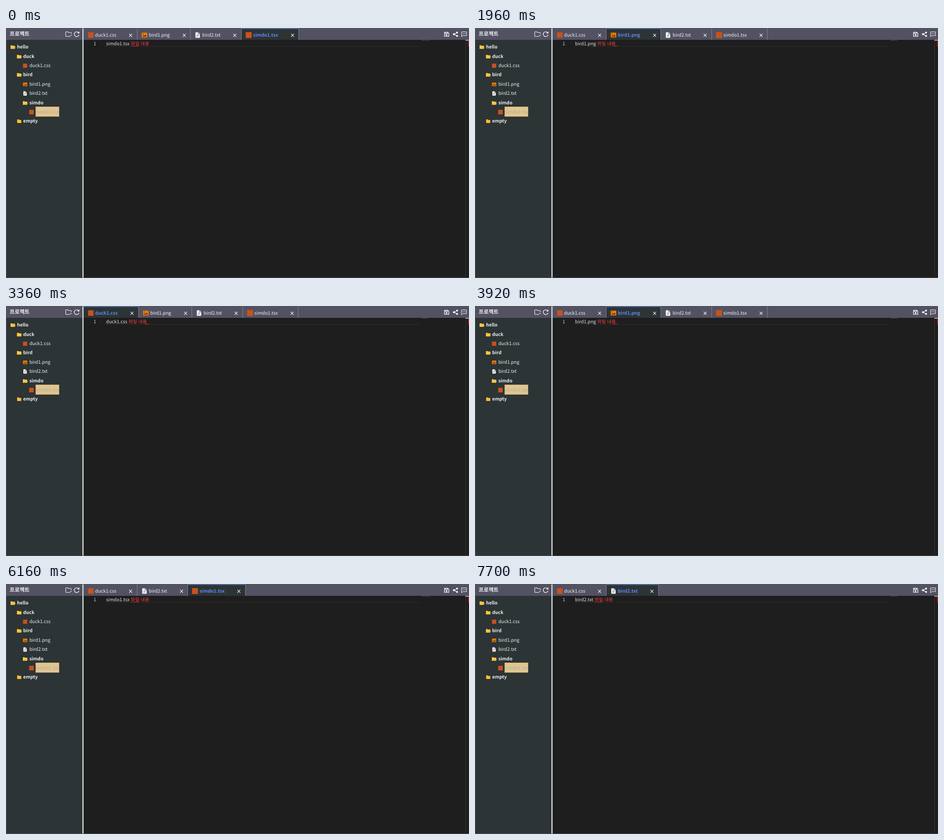
These frames come from a looping animation (1018 by 550 pixels, 8000 ms). An HTML page:

```html
<!DOCTYPE html>
<html lang="ko">
<head>
<meta charset="utf-8">
<title>Project editor</title>
<style>
  html, body { margin: 0; width: 100%; height: 100%; overflow: hidden; background: #1e1e1e; }
  body {
    position: relative; color: #f1f2f4; text-rendering: geometricPrecision;
    font: 10.2px/20.4px "Noto Sans CJK KR", "Noto Sans CJK JP", "Noto Sans CJK", sans-serif;
  }
  div, .stage > svg, .tab svg, .row svg, .name { position: absolute; white-space: pre; }
  svg { overflow: visible; }
  .stage { left: 0; top: 0; width: 1018px; height: 550px; overflow: hidden; }
  .side { left: 0; top: 0; width: 168px; height: 550px; background: #2d3436; }
  .bar { left: 0; top: 0; width: 1018px; height: 26px; background: #535263; }
  .title { left: 8px; top: 3px; font-size: 11.9px; font-weight: 700; }
  .tabs, .stage > svg { left: 0; top: 0; }
  .split { left: 168px; top: 0; width: 2px; height: 550px; background: #dcdde1; border-right: 1px solid #85858b; }
  .edge { left: 0; top: 0; width: 1017px; height: 548px; border: 1px solid #53535b; border-width: 1px 0 1px 1px; }

  .row { left: 0; width: 168px; height: 20.4px; color: #eceeef; }
  .row svg { top: 6px; width: 10px; height: 10px; }
  .row .name { top: 0; }
  .folder { font-weight: 700; }
  .row .picked {
    top: -1px; line-height: 22px; color: #b5ad9b; background: #dec694;
    box-shadow: inset 0 0 0 1px #dcad5f;
  }

  .tab { top: 1px; height: 25px; border-right: 1px solid #85848f; box-sizing: border-box; }
  .tab svg { left: 9.2px; top: 8px; width: 13px; height: 13px; }
  .tab .close { left: auto; right: 9.5px; top: 10.5px; width: 8px; height: 8px; }
  .tab .name { left: 25.6px; top: 3.6px; font-weight: 500; }
  .tab.on { top: 0; height: 26px; background: #2d3436; border-top: 2px solid #5b83e6; }
  .tab.on svg { top: 7px; }
  .tab.on .close { top: 9.5px; }
  .tab.on .name { top: 2.6px; color: #5f87f2; font-weight: 700; }

  .line { left: 217px; top: 26px; width: 691px; height: 14px; border-bottom: 1px solid #303030; }
  .num { left: 192.5px; top: 23.5px; color: #d0d0d0; }
  .code { left: 220.1px; top: 23.5px; color: #e2e2e2; }
  .bad { position: relative; color: #ff3b3b; }
  .bad svg { position: absolute; left: 0; top: 12.4px; width: 19px; height: 3px; }
  .bad .tail { left: auto; right: -3px; width: 7px; }
  .ruler { left: 1010px; top: 26px; width: 1px; height: 521px; background: #363636; }
  .caret { left: 1010px; top: 26px; width: 8px; height: 1.5px; background: #a0a0a0; }
  .error { left: 1016px; top: 28px; width: 2px; height: 13px; background: #bb1616; }
</style>
</head>
<body>
<svg width="0" height="0" style="position:absolute" aria-hidden="true">
  <symbol id="css" viewBox="0 0 13 13"><path fill="#c8521b" d="M.5.5h12v12H.5z"/></symbol>
  <symbol id="tsx" viewBox="0 0 13 13"><path fill="#c8521b" d="M0 0h13v13H0z"/></symbol>
  <symbol id="png" viewBox="0 0 13 13">
    <rect y="1.3" x=".4" width="12.2" height="10.4" rx="1.3" fill="#f57c00"/>
    <path fill="#4a3428" d="M2 9.8l2.4-3 1.7 2 2.4-3.2 2.6 4.2z"/><circle cx="4" cy="4.3" r="1" fill="#4a3428"/>
  </symbol>
  <symbol id="txt" viewBox="0 0 13 13">
    <path fill="#fff" d="M2.6.4h5.2l3.4 3.4v7.8a1 1 0 0 1-1 1H2.6a1 1 0 0 1-1-1V1.4a1 1 0 0 1 1-1z"/>
    <path stroke="#4d4d59" d="M4 6.8h5M4 9.3h3.6M7.6 1v3.2h3.2" fill="none"/>
  </symbol>
  <symbol id="shut" viewBox="0 0 10 10"><path fill="#fbc02d" d="M.5 2q0-1 1-1h2.3L5 2.2h3.6q1 0 1 1V8q0 1-1 1H1.5q-1 0-1-1z"/></symbol>
  <symbol id="open" viewBox="0 0 10 10" overflow="visible">
    <path fill="#fbc02d" d="M0 2q0-1 1-1h2.5l1 1H9q1 0 1 1v5q0 1-1 1H1Q0 9 0 8z"/>
    <path d="M.6 8.6L2.3 4.4H9.6" stroke="#ffe08a" stroke-width=".7" fill="none"/>
    <path d="M9.4 3.5v5M10.6 5.7h2" stroke="#9fa4a5" stroke-width=".8"/>
  </symbol>
  <symbol id="x" viewBox="0 0 8 8"><path d="M.8.6l6.4 6.8M7.2.6L.8 7.4" stroke="#fff" stroke-width="1.1"/></symbol>
</svg>

<div class="stage">
  <div class="side" id="tree"></div>
  <div class="bar"></div>
  <div class="title">프로젝트</div>
  <div class="line"></div>
  <div class="num">1</div>
  <div class="code" id="code"></div>
  <div class="ruler"></div><div class="caret"></div><div class="error"></div>
  <div class="tabs" id="tabs"></div>
  <div class="split"></div>
  <div class="edge"></div>
  <svg width="1018" height="30" fill="none" stroke="#fff" stroke-width="1.1">
    <path d="M141.5 18.5H132.3q-1 0-1-1V9.3q0-1 1-1h3.3l1.6 1.7h5.5q1 0 1 1v2.2M140.8 16.2h4"/>
    <path d="M160 11a5.3 5.3 0 1 0 .5 4M160.6 8v3.4h-3.4" stroke-width="1.3"/>
    <path d="M964.2 9.3h7.2l2.2 2.2v6.9h-9.4zM966 9.5v2.6h4.6V9.5" stroke-width="1.3"/>
    <circle cx="968.8" cy="15.2" r="1.2" fill="#fff"/>
    <path d="M992 10l-7 3.7 7 3.7" stroke-width="1.3"/>
    <g fill="#fff" stroke="none">
      <circle cx="991.8" cy="10" r="2"/><circle cx="984.8" cy="13.7" r="2.1"/><circle cx="991.8" cy="17.4" r="2"/>
      <circle cx="1004.3" cy="12.6" r=".8"/><circle cx="1007" cy="12.6" r=".8"/><circle cx="1009.7" cy="12.6" r=".8"/>
    </g>
    <path d="M1001.6 8.5h10.9v8.3h-7.8l-3.1 2.4z" stroke-width="1"/>
    <g stroke-width="1.2" stroke-dasharray="1.6 .5" opacity=".75">
      <path id="mapName"/><path id="mapBad" stroke="#b83838"/>
    </g>
  </svg>
</div>

<script>
  const $ = id => document.getElementById(id);
  const icon = (id, cls = "") => `<svg class="${cls}"><use href="#${id}"/></svg>`;

  const files = {
    css: { name: "duck1.css", idle: 118, on: 121, map: 930 },
    png: { name: "bird1.png", idle: 117.5, on: 120.5, map: 931 },
    txt: { name: "bird2.txt", idle: 111.5, on: 115, map: 930 },
    tsx: { name: "simdo1.tsx", idle: 122.8, on: 126.5, map: 933 }
  };

  // depth, icon, label
  const tree = [
    [0, "open", "hello"], [1, "open", "duck"], [2, "css", files.css.name],
    [1, "open", "bird"], [2, "png", files.png.name], [2, "txt", files.txt.name],
    [2, "open", "simdo"], [3, "tsx", files.tsx.name], [1, "shut", "empty"]
  ];

  const all = ["css", "png", "txt", "tsx"];
  const three = ["css", "txt", "tsx"];
  const two = ["css", "txt"];

  // start in ms, active file, open tabs, error check finished
  const steps = [
    [0, "tsx", all, true], [1960, "png", all, false],
    [2520, "txt", all, false], [3080, "txt", all, true],
    [3360, "css", all, false], [3850, "png", all, false], [4480, "png", all, true],
    [4900, "css", three, false], [5390, "css", three, true],
    [5600, "tsx", three, false], [6160, "tsx", three, true],
    [7140, "txt", two, false], [7700, "txt", two, true]
  ];
  const loop = 8000;

  $("tree").innerHTML = tree.map(([depth, kind, label], i) => {
    const folder = kind === "open" || kind === "shut";
    const x = 13.6 * depth;
    return `<div class="row ${folder ? "folder" : ""}" style="top:${31.2 + 20.4 * i}px">
      <svg style="left:${10.2 + x}px"><use href="#${kind}"/></svg><span
      class="name ${kind === "tsx" ? "picked" : ""}" style="left:${24.2 + x}px">${label}</span></div>`;
  }).join("");

  function wave(width, cls = "") {
    let d = "M0 2.6";
    for (let x = 2.4, up = true; x <= width; x += 2.4, up = !up) d += `L${x} ${up ? .5 : 2.6}`;
    return `<svg class="${cls}"><path d="${d}" fill="none" stroke="#ee2f2f" stroke-width="1"/></svg>`;
  }

  function show([, active, open, checked]) {
    let x = 170.5;
    $("tabs").innerHTML = open.map(key => {
      const on = key === active;
      const file = files[key];
      const width = on ? file.on : file.idle;
      const html = `<div class="tab ${on ? "on" : ""}" style="left:${x}px;width:${width}px">${icon(key)}<span
        class="name">${file.name}</span>${icon("x", "close")}</div>`;
      x += width;
      return html;
    }).join("");

    const file = files[active];
    $("code").innerHTML = checked
      ? `${file.name} <span class="bad">파일${wave(19)}</span><span class="bad"> 내용</span>`
      : `${file.name} <span class="bad">파일 내용${wave(7.3, "tail")}</span>`;

    const cut = checked ? 921 : 924;
    $("mapName").setAttribute("d", `M915 26.8H${cut}`);
    $("mapName").setAttribute("stroke", checked ? "#56779c" : "#77777c");
    $("mapBad").setAttribute("d", `M${cut + 1} 26.8H${file.map - 1}`);
  }

  let shown;
  function tick() {
    const t = performance.now() % loop;
    const step = steps.findLast(s => s[0] <= t);
    if (step !== shown) show(shown = step);
    requestAnimationFrame(tick);
  }
  tick();
</script>
</body>
</html>
```
